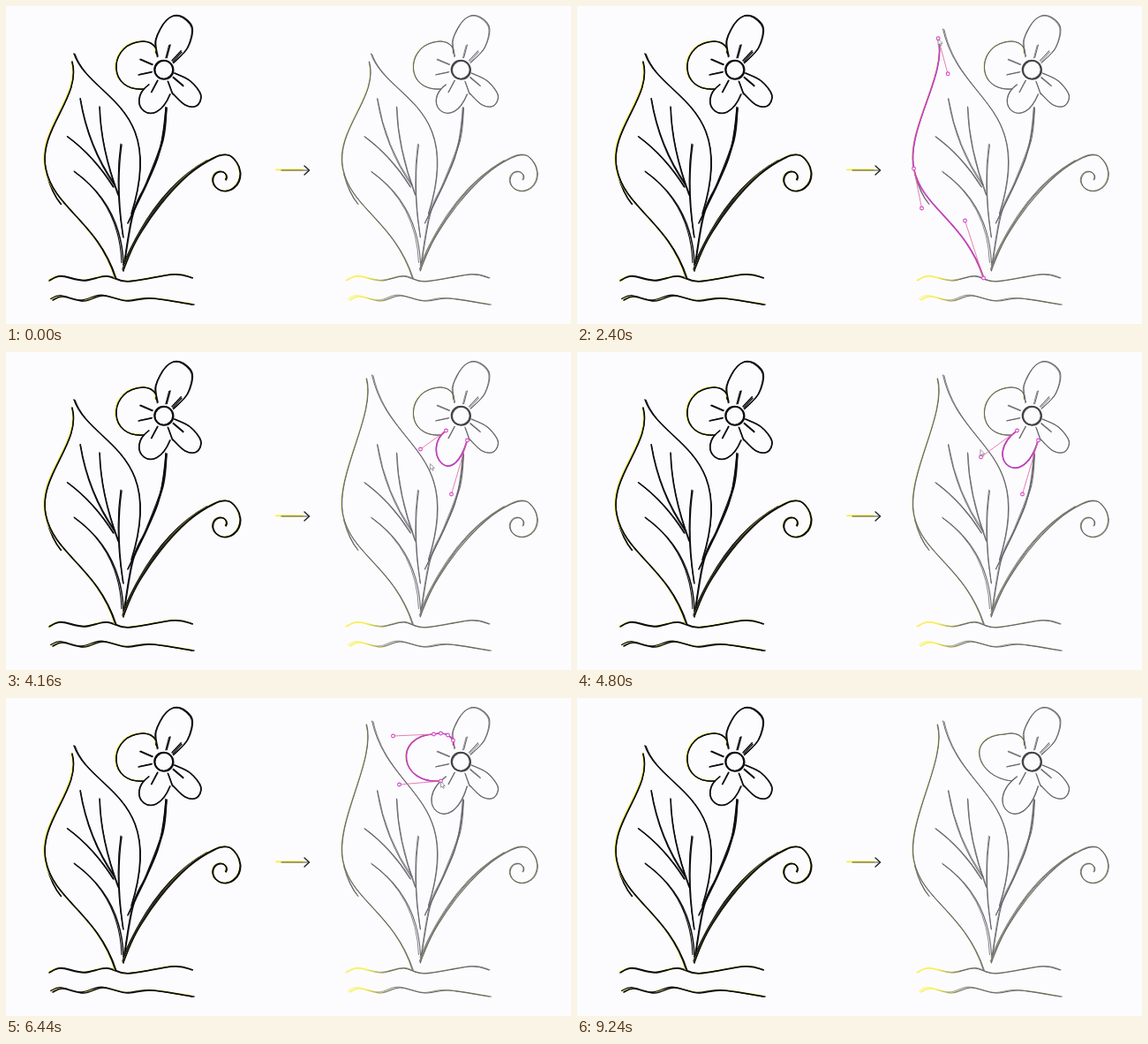
Write an HTML page that moves like this. It is 640 px wide and 360 px high and loops after 9280 ms.

```html
<!DOCTYPE html>
<html lang="en">
<head>
<meta charset="utf-8">
<title>Sketch editing</title>
<style>
  html, body { margin: 0; width: 100%; height: 100%; overflow: hidden; background: #fcfcfe; }
  svg { display: block; width: 640px; height: 360px; }
  path, circle { fill: none; stroke-linecap: round; stroke-linejoin: round; }
  #editor circle, #cursor { fill: #fff; }
</style>
</head>
<body>
<svg viewBox="0 0 640 360">
  <defs>
    <linearGradient id="sun" gradientUnits="userSpaceOnUse" x1="49" y1="0" x2="98" y2="0">
      <stop offset="0.45" stop-color="#f7ef45"/>
      <stop offset="1" stop-color="#66666b"/>
    </linearGradient>
  </defs>
  <g id="left"></g>
  <path d="M306 185.3H336" stroke="#f6ee3a" stroke-width="1.7"/>
  <path d="M312 186H343" stroke="#3c3a16" stroke-width=".9"/>
  <path d="M338 181L343.5 186L338 191" stroke="#222" stroke-width="1.4"/>
  <g id="right" transform="translate(336.5 0)"></g>
  <g id="editor" transform="translate(336.5 0)"></g>
  <path id="cursor" d="M0 0V6.2L1.6 4.9L2.8 7.4L3.9 6.9L2.7 4.5H4.6Z" stroke="#77777d" stroke-width=".7"/>
</svg>
<script>
const LOOP = 9280;
const RIGHT_X = 336.5;
const byId = id => document.getElementById(id);
const ease = u => u <= 0 ? 0 : u >= 1 ? 1 : u * u * (3 - 2 * u);
const polar = (x, y, r, angle) => [x + r * Math.cos(angle), y + r * Math.sin(angle)];

function add(parent, tag, attrs) {
  const el = document.createElementNS('http://www.w3.org/2000/svg', tag);
  for (const key in attrs) el.setAttribute(key, attrs[key]);
  return parent.appendChild(el);
}

function seeded(seed) {
  return () => (seed = (seed * 16807) % 2147483647) / 2147483647;
}

// Catmull-Rom curve through the given points.
function smooth(...pts) {
  const toward = (p, a, b) => p.map((v, i) => v + (b[i] - a[i]) / 6);
  return 'M' + pts[0] + pts.slice(1).map((p, i) => {
    const from = pts[i], before = pts[i - 1] || from, after = pts[i + 2] || p;
    return 'C' + [toward(from, before, p), toward(p, after, from), p].join(' ');
  }).join('');
}

const bend = (from, via, to) => `M${from}Q${via} ${to}`;

const heart = [178.5, 72];
const curl = Array.from({ length: 17 }, (_, i) =>
  polar(245, 195, 27 * Math.exp(-0.11 * i), i * 0.5 - 1.3));
const tendril = smooth([133, 299], [148, 265], [175, 225], [207, 191], [236, 172], ...curl);
const stamens = [-75, -47, 40, 70, 118, 168, 203].map(deg =>
  'M' + polar(...heart, 14, deg * Math.PI / 180) + 'L' + polar(...heart, 29, deg * Math.PI / 180));

const plainStrokes = [
  smooth([182, 115], [178, 152], [160, 200], [144, 236], [133, 300]),
  smooth([182, 116], [172, 172], [138, 246]),
  bend([134, 294], [170, 208], [228, 175]),
  bend([84, 105], [93, 160], [123, 203]),
  bend([106, 114], [107, 160], [127, 214]),
  bend([70, 148], [100, 170], [122, 205]),
  bend([78, 188], [130, 225], [133, 291]),
  bend([131, 157], [124, 205], [133, 262]),
  bend([46, 190], [52, 212], [62, 224]),
  smooth([172, 57], [170, 38], [182, 16], [197, 11], [211, 24], [206, 47], [190, 64]),
  smooth([191, 76], [209, 85], [221, 101], [216, 113], [203, 112], [189, 99]),
  ...stamens
];
const ground = [
  smooth([49, 311], [62, 306], [88, 311], [114, 306], [138, 312], [190, 304], [211, 308]),
  smooth([53, 333], [64, 329], [88, 334], [110, 328], [138, 334], [165, 331], [213, 338])
];

// Editable points; a tip carries its handle along.
const base = {
  tipR: [77, 54], tipRHandle: [95, 105], endR: [142, 235], endRHandle: [181, 110],
  tipL: [75, 63], tipLHandle: [86, 103], side: [45, 184], sideHandle: [54, 229],
  foot: [124, 308], footHandle: [103, 243],
  lowA: [162, 89], lowAHandle: [133, 110], lowB: [186, 100], lowBHandle: [168, 144],
  rim: [148, 41], rimHandle: [116, 48], base: [156, 94], baseHandle: [116, 97]
};
const carriedBy = { tipRHandle: 'tipR', tipLHandle: 'tipL' };

const drag = (from, to, point, dx, dy) => ({ from, to, point, by: [dx, dy] });
const drags = [
  drag(360, 800, 'tipR', 1, -28),
  drag(900, 1280, 'tipRHandle', 1, 33),
  drag(1920, 2600, 'tipL', -3, -33),
  drag(3480, 3960, 'lowBHandle', 0, 17),
  drag(4280, 4720, 'lowAHandle', -12, 9),
  drag(5080, 5300, 'rimHandle', -5, -1),
  drag(5380, 5540, 'baseHandle', -7, 1),
  drag(5700, 6040, 'rimHandle', -9, -4),
  drag(6360, 6460, 'base', 0, 0),
  drag(6680, 7240, 'baseHandle', 7, -8)
];

function pointAt(name, t) {
  return drags
    .filter(d => d.point === name || d.point === carriedBy[name])
    .reduce((p, d) => p.map((v, i) => v + d.by[i] * ease((t - d.from) / (d.to - d.from))), base[name]);
}

// The pointer holds the dragged point and glides to the next one in between.
const enter = { time: 40, place: [184, 150] }, leave = { time: 8920, place: [254, 350] };
function cursorAt(t) {
  const previous = drags.filter(d => d.from <= t).pop();
  const next = drags.find(d => d.from > t);
  const a = previous ? pointAt(previous.point, t) : enter.place;
  const b = next ? pointAt(next.point, t) : leave.place;
  const start = previous ? previous.to : enter.time;
  const end = next ? next.from : leave.time;
  const e = ease((t - start) / (end - start));
  return a.map((v, i) => v + (b[i] - v) * e);
}

const cubic = (p, a, aHandle, bHandle, b) => `M${p[a]}C${p[aHandle]} ${p[bHandle]} ${p[b]}`;
const rimNodes = [[156, 40], [164, 42], [170, 48]];
const shapes = [
  { from: 160, to: 1640, nodes: ['tipR', 'endR'],
    path: p => cubic(p, 'tipR', 'tipRHandle', 'endRHandle', 'endR') },
  { from: 1800, to: 3000, nodes: ['tipL', 'side', 'foot'], glow: true,
    path: p => `M${p.tipL}C${p.tipLHandle} 36,139 ${p.side}C${p.sideHandle} ${p.footHandle} ${p.foot}` },
  { from: 3240, to: 4880, nodes: ['lowA', 'lowB'],
    path: p => cubic(p, 'lowA', 'lowAHandle', 'lowBHandle', 'lowB') },
  { from: 5040, to: 7900, nodes: ['rim', 'base'], extraNodes: rimNodes, glow: true,
    path: p => smooth([170, 53], ...rimNodes.slice().reverse(), p.rim) +
      cubic(p, 'rim', 'rimHandle', 'baseHandle', 'base') }
];

const pointsAt = t => Object.fromEntries(Object.keys(base).map(name => [name, pointAt(name, t)]));
const setPaths = (strokes, d) => strokes.forEach(el => el.setAttribute('d', d));

// Draws the plant and returns the strokes of each editable shape.
function drawPlant(parent, ink) {
  const random = seeded(2024);
  const jitter = size => ((random() - 0.5) * size).toFixed(2);
  const pencil = (d, glow, color = ink.color) => {
    const strokes = [];
    const stroke = (paint, width, transform, opacity = 1) => strokes.push(
      add(parent, 'path', { d, stroke: paint, 'stroke-width': width, transform, opacity }));
    if (glow) stroke('#f5ee40', ink.width, 'translate(-1 -.6)', ink.glow);
    stroke(color, ink.width, 'translate(0 0)');
    stroke(color, ink.width * 0.75, `translate(${jitter(2)} ${jitter(2)}) rotate(${jitter(1.2)} 130 180)`);
    return strokes;
  };
  plainStrokes.forEach(d => pencil(d, false));
  pencil(tendril, true);
  ground.forEach(d => pencil(d, true, ink.ground));
  [[0, 0], [0.7, 0.5]].forEach(([dx, dy]) => add(parent, 'circle', {
    cx: heart[0] + dx, cy: heart[1] + dy, r: 10.5, stroke: ink.ring, 'stroke-width': 1.6 }));
  return shapes.map(shape => pencil('M0 0', shape.glow));
}

const black = { color: '#0c0c0e', ring: '#0c0c0e', ground: '#0c0c0e', width: 1.5, glow: 0.9 };
const gray = { color: '#66666b', ring: '#444448', ground: 'url(#sun)', width: 1.05, glow: 0.4 };

const initial = pointsAt(0);
drawPlant(byId('left'), black).forEach((strokes, i) => setPaths(strokes, shapes[i].path(initial)));
const editable = drawPlant(byId('right'), gray);
const editor = byId('editor'), cursor = byId('cursor');

function drawSelection(shape, points) {
  add(editor, 'path', { d: shape.path(points), stroke: '#cc3cca', 'stroke-width': 1.7, opacity: 0.9 });
  const knots = [...(shape.extraNodes || [])];
  for (const name of shape.nodes) {
    const node = points[name], handle = points[name + 'Handle'];
    add(editor, 'path', { d: `M${node}L${handle}`, stroke: '#e0609c', 'stroke-width': 0.8 });
    knots.push(node, handle);
  }
  knots.forEach(([cx, cy]) =>
    add(editor, 'circle', { cx, cy, r: 1.9, stroke: '#d848cc', 'stroke-width': 1.1 }));
}

function render(t) {
  const points = pointsAt(t);
  editable.forEach((strokes, i) => setPaths(strokes, shapes[i].path(points)));

  editor.replaceChildren();
  const selected = shapes.find(s => t >= s.from && t < s.to);
  if (selected) drawSelection(selected, points);

  const [x, y] = cursorAt(t);
  cursor.setAttribute('transform', `translate(${x + RIGHT_X} ${y + 1})`);
  cursor.setAttribute('visibility', t >= enter.time && t < leave.time ? 'visible' : 'hidden');
}

const start = performance.now();
function frame() {
  render((performance.now() - start) % LOOP);
  requestAnimationFrame(frame);
}
render(0);
requestAnimationFrame(frame);
</script>
</body>
</html>
```
